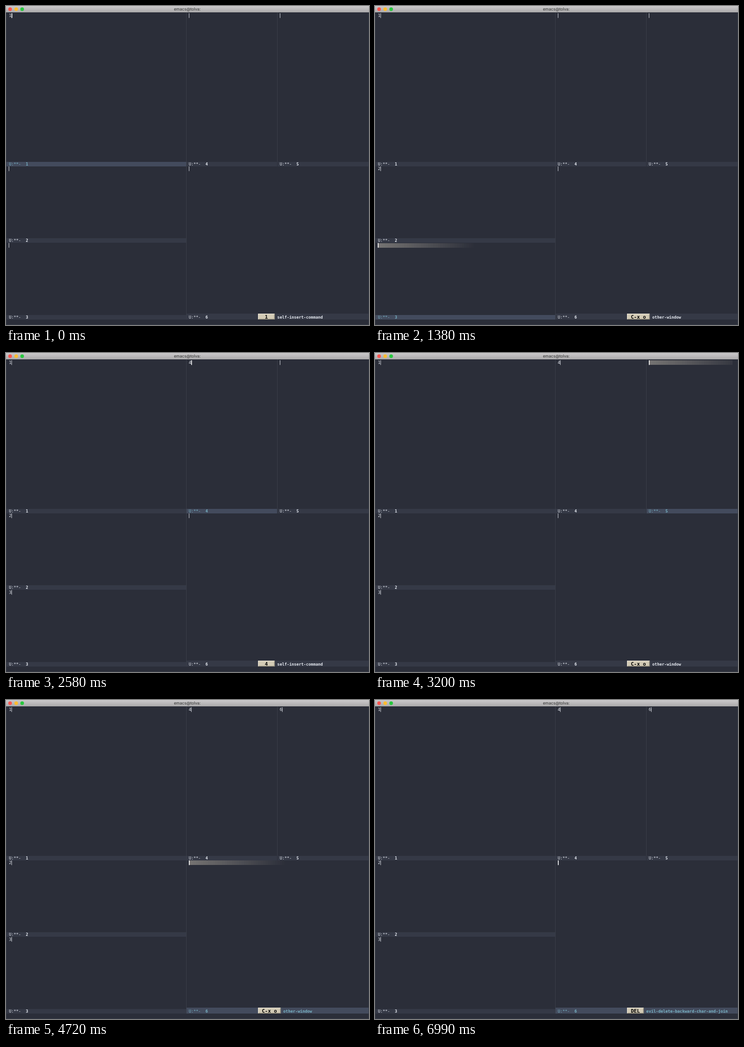
Animation, 798 px wide and 702 px high, one loop 8000 ms. Source, as an HTML page:

```html
<!DOCTYPE html>
<html lang="en">
<head>
<meta charset="utf-8">
<title>Window switching</title>
<style>
  html, body { margin: 0; width: 798px; height: 702px; overflow: hidden; background: #2b2e39; }
  svg { display: block; }
  text { font: 8.75px "DejaVu Sans Mono", monospace; white-space: pre; fill: #e5e9f0; }
  .bold { font-weight: bold; }
  .on { fill: #78b2c4; }
  .key { font-size: 11px; font-weight: bold; fill: #000; text-anchor: middle; }
  .title { font: 8.8px Inter, sans-serif; fill: #303030; text-anchor: middle; }
</style>
</head>
<body>
<svg width="798" height="702" viewBox="0 0 798 702">
  <defs>
    <linearGradient id="bar" x2="0" y2="1">
      <stop stop-color="#cbc9cb"/><stop offset="1" stop-color="#aaa9aa"/>
    </linearGradient>
  </defs>
  <rect width="798" height="702" fill="#2b2e39"/>
  <path d="M.5 14V701.5H797.5V14" fill="none" stroke="#3a3e49"/>
  <path d="M396.5 14V690M596.5 14V343" stroke="#3a3e49"/>
  <rect width="798" height="14" fill="url(#bar)"/>
  <circle cx="9" cy="7" r="4" fill="#fc5650"/>
  <circle cx="22.4" cy="7" r="4" fill="#fdbc30"/>
  <circle cx="35.5" cy="7" r="4" fill="#28c73f"/>
  <text class="title" x="398.5" y="10.3">emacs@tolva:</text>
  <g id="view"></g>
</svg>
<script>
const LOOP = 8000, CHAR = 5.268;
const INSERT = 'self-insert-command', OTHER = 'other-window', DEL = 'evil-delete-backward-char-and-join';

// left, right, first line top, mode line top, mode line height, beacon cells
const panes = [
  [1, 396, 16, 343, 10, 40],
  [1, 396, 353, 511, 10, 40],
  [1, 396, 521.5, 680, 10, 40],
  [397, 596, 16, 343, 10, 35],
  [597, 797, 16, 343, 10, 35],
  [397, 797, 353, 677, 13, 40],
];

// time, selected pane, its text, key, command
const steps = [
  [0, 0, '1', '1', INSERT],
  [630, 1, '', 'C-x o', OTHER],
  [940, 1, '2', '2', INSERT],
  [1380, 2, '', 'C-x o', OTHER],
  [1590, 2, '3', '3', INSERT],
  [2040, 3, '', 'C-x o', OTHER],
  [2580, 3, '4', '4', INSERT],
  [3200, 4, '', 'C-x o', OTHER],
  [4100, 4, '6', 'C-x o', OTHER],
  [4720, 5, '', 'C-x o', OTHER],
  [5020, 5, '6', '6', INSERT],
  [5830, 5, '65', '5', INSERT],
  [5990, 5, '655', '5', INSERT],
  [6150, 5, '6555', '5', INSERT],
  [6540, 5, '655', 'DEL', DEL],
  [6680, 5, '65', 'DEL', DEL],
  [6820, 5, '6', 'DEL', DEL],
  [6990, 5, '', 'DEL', DEL],
];

const rect = (x, y, w, h, fill) =>
  `<rect x="${x}" y="${y}" width="${w}" height="${h}" fill="${fill}"/>`;
const label = (x, y, str, cls = '') => `<text x="${x}" y="${y}" class="${cls}">${str}</text>`;

function beacon(x, y, cells) {
  const from = [117, 115, 114], to = [43, 46, 57];
  let out = '';
  for (let i = 0; i < cells; i++) {
    const c = from.map((v, k) => Math.round(v + (to[k] - v) * i / 40));
    out += `<g shape-rendering="crispEdges">${rect(x + i * CHAR, y, CHAR, 10.3, `rgb(${c})`)}</g>`;
  }
  return out;
}

function pane(i, text, active, flash) {
  const [left, right, top, mode, height, cells] = panes[i];
  const x = left < 10 ? 6.5 : left + 4.7;
  const base = i === 5 ? 688 : mode + 8.3;
  const tint = active ? 'on' : '';
  const caret = Math.round(x + text.length * CHAR - 0.2);
  return rect(left, mode, right - left, height, active ? '#434b5d' : '#353946')
    + (flash ? beacon(x, top, cells) : '')
    + label(x, top + 8.2, text)
    + rect(caret, top, active ? 1.7 : 1, 10.3, active ? '#fff' : '#d4d7de')
    + label(x, base, 'U:**-', tint)
    + label(x + 7 * CHAR, base, i + 1, 'bold ' + tint);
}

function keycast(key, cmd, active) {
  const x = 554, y = 677, h = 13, w = 17 + 6.62 * Math.max(3, key.length);
  return rect(x, y, w, h, '#d3cbb6')
    + `<path d="M${x} ${y + h}V${y}H${x + w}l-1 1H${x + 1}V${y + h - 1}z" fill="#f1ecdf"/>`
    + `<path d="M${x} ${y + h}H${x + w}V${y}l-1.5 1.5V${y + h - 1.5}H${x + 1.5}z" fill="#8d8878"/>`
    + label(x + w / 2, y + 10.8, key, 'key')
    + label(x + w + 5.5, y + 10.8, cmd, 'bold ' + (active ? 'on' : ''));
}

function draw(n) {
  const [, selected, , key, cmd] = steps[n];
  const texts = panes.map(() => '');
  for (const [, p, text] of steps.slice(0, n + 1)) texts[p] = text;
  const flash = cmd === OTHER && !texts[selected];
  view.innerHTML = texts.map((s, i) => pane(i, s, i === selected, flash && i === selected)).join('')
    + keycast(key, cmd, selected === 5);
}

const view = document.getElementById('view');
const start = performance.now();
let shown = -1;

function tick() {
  const t = (performance.now() - start) % LOOP;
  const n = steps.filter(s => s[0] <= t).length - 1;
  if (n !== shown) draw(shown = n);
  requestAnimationFrame(tick);
}
tick();
</script>
</body>
</html>
```
